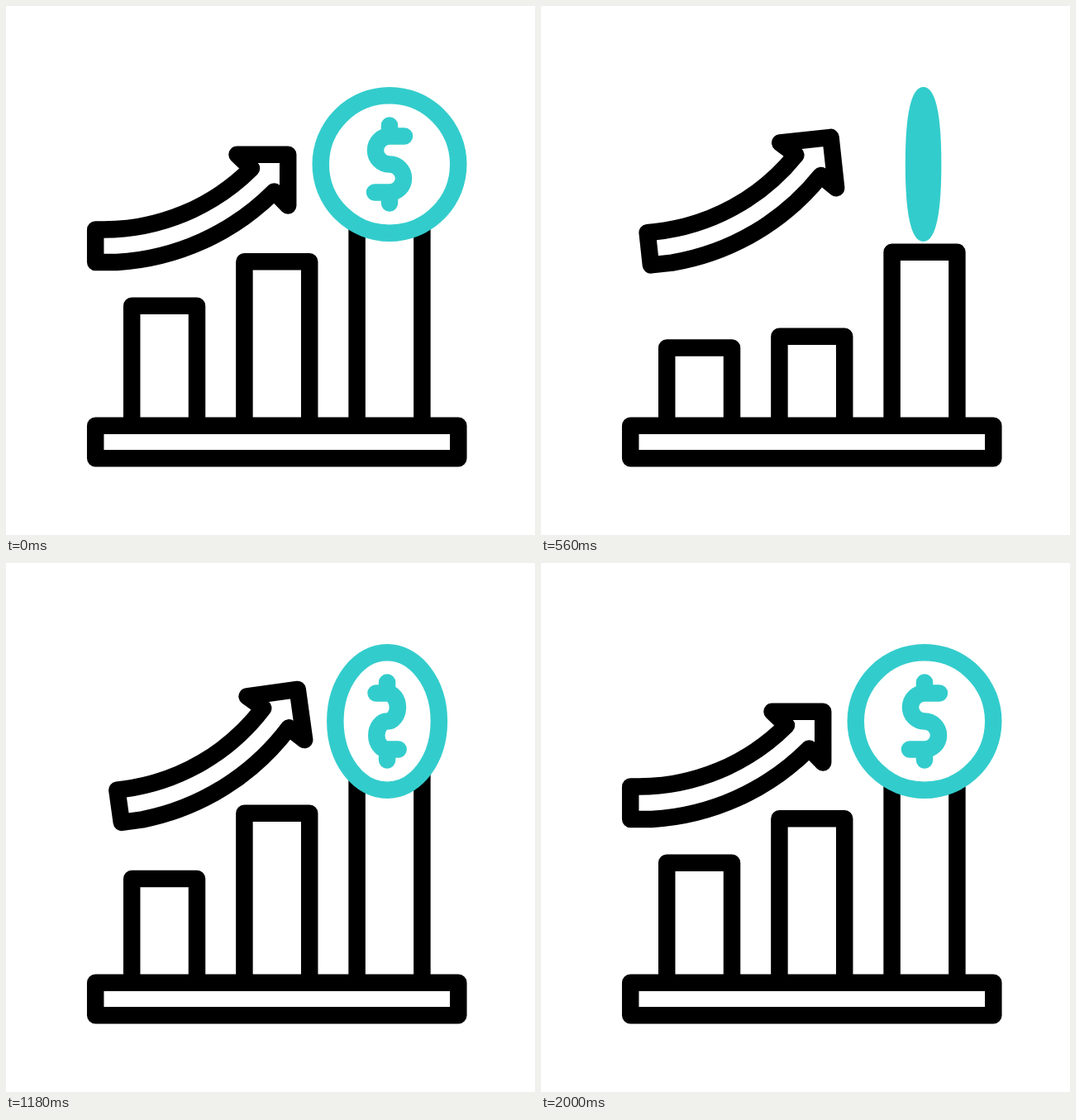
Animation of 640x640 px, one loop 2020 ms. Source, as an HTML page:

```html
<!DOCTYPE html>
<html lang="en">
<head>
<meta charset="utf-8">
<title>Growth chart</title>
<style>
  html, body { margin: 0; width: 100%; height: 100%; overflow: hidden; background: #fff; }
  svg { display: block; width: 640px; height: 640px; }
  path, ellipse {
    fill: none; stroke: #000; stroke-width: 20.5;
    stroke-linecap: round; stroke-linejoin: round;
  }
  #coin > * { stroke: #3cc; }
  #coin ellipse { fill: #fff; }
</style>
</head>
<body>
<svg viewBox="0 0 640 640">
  <path class="bar"/>
  <path class="bar"/>
  <path class="bar"/>
  <path d="M108.2 507.8H547.3V547.2H108.2Z"/>
  <path id="arrow" d="M108.2 270.5H118A253 253 0 0 0 297 196.5L279.5 179.8H341.2V241.5L324.4 224.4A292.5 292.5 0 0 1 134 310H108.2Z"/>
  <g id="coin"><ellipse cy="191.5" ry="83.25"/><path/></g>
</svg>
<script>
const LOOP = 2020, BEAT = 400;
const bars = [...document.querySelectorAll('.bar')];
const arrow = document.getElementById('arrow');
const [ring, dollar] = document.getElementById('coin').children;

// Smooth motion through evenly spaced keys, held before and after.
function follow(keys, t, start, step) {
  const pos = Math.min(Math.max((t - start) / step, 0), keys.length - 1);
  const i = Math.min(Math.floor(pos), keys.length - 2);
  const p = pos - i;
  return keys[i] + (keys[i + 1] - keys[i]) * p * p * (3 - 2 * p);
}

const barTops = [362.8, 309.3, 264.6];

function drawBar(bar, i, t) {
  const x = 152.2 + 136.2 * i;
  const y = barTops[i] + follow([0, 93, -26, 19.6, 0], t, i * 200, BEAT);
  bar.setAttribute('d', `M${x} 507.8V${y}H${x + 78.8}V507.8`);
}

// The outline keeps its weight while the coin is squeezed sideways.
function drawCoin(s) {
  const x = dx => 462.35 + (1.65 + dx) * s;
  const r = Math.abs(17 * s);
  const [a, b] = s > 0 ? [0, 1] : [1, 0];
  ring.setAttribute('cx', x(0));
  ring.setAttribute('rx', Math.abs(83.25 * s));
  dollar.setAttribute('d',
    `M${x(18)} 157.5H${x(0)}A${r} 17 0 0 ${a} ${x(0)} 191.5` +
    `A${r} 17 0 0 ${b} ${x(0)} 225.5H${x(-18)}` +
    `M${x(0)} 144.5V157.5M${x(0)} 225.5V238.5`);
}

function frame(now) {
  const t = now % LOOP;
  bars.forEach((bar, i) => drawBar(bar, i, t));
  const angle = follow([0, -14, 8, -8, 2, 0], t, 0, BEAT);
  arrow.setAttribute('transform', `rotate(${angle} 152 83)`);
  drawCoin(follow([1, -1.017, 1], t, 200, 2 * BEAT));
  requestAnimationFrame(frame);
}
frame(performance.now());
</script>
</body>
</html>
```
